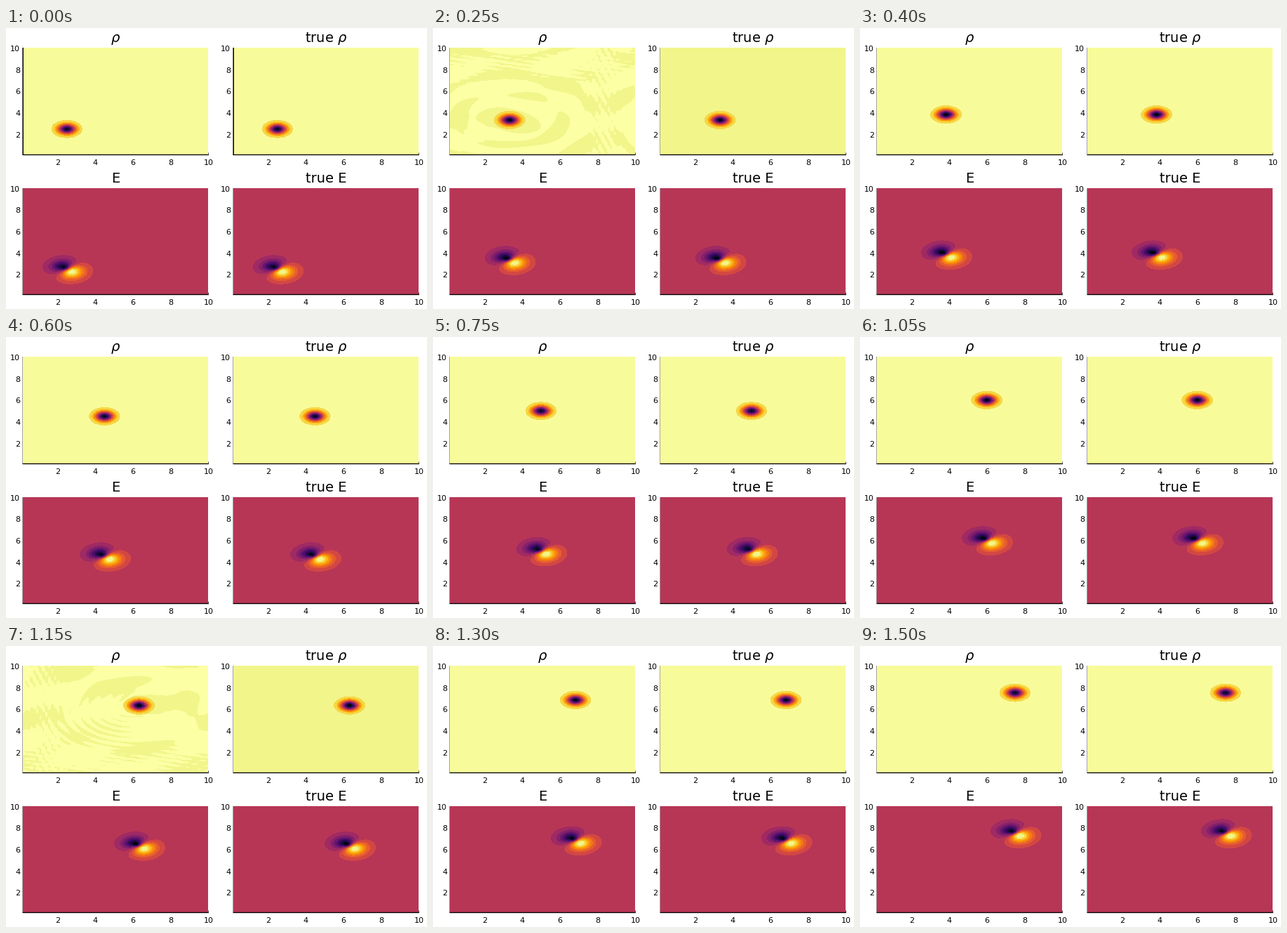
These frames come from a looping animation (600 by 400 pixels, 1550 ms). A matplotlib script:

```python
import numpy as np
import matplotlib.pyplot as plt
from matplotlib.animation import FuncAnimation

W, H, DPI = 600, 400, 100
FRAMES, STEP_MS = 31, 50
BANDS = 15
PALE, PALE_NOISY, PALE_TOP = "#f8fb9a", "#f2f58a", "#fcffa4"
CRIMSON = "#b73656"

plt.rcParams["font.family"] = "DejaVu Sans"
plt.rcParams["mathtext.fontset"] = "dejavusans"

# periodic 10 x 10 box sampled on 64 x 64 points
N = 64
grid = np.arange(1, N + 1) * 10 / N
X, Y = np.meshgrid(grid, grid)
inferno = plt.get_cmap("inferno")
colors = [inferno((k + 0.5) / BANDS) for k in range(BANDS)]
e_colors = list(colors)
e_colors[BANDS // 2] = CRIMSON

fig = plt.figure(figsize=(W / DPI, H / DPI), dpi=DPI, facecolor="white")


def make_stage(zorder):
    """Pixel-space layer covering the whole figure."""
    layer = fig.add_axes([0, 0, 1, 1], zorder=zorder)
    layer.set_xlim(0, W)
    layer.set_ylim(H, 0)
    layer.axis("off")
    return layer


under, over = make_stage(-5), make_stage(5)


def line(layer, xs, ys, color="black", width=1.3):
    return layer.plot(xs, ys, color=color, lw=width * 72 / DPI,
                      solid_capstyle="butt", snap=False)[0]


def make_panel(left, top, bottom, title):
    """Plot area with title and tick labels; returns it and its side axis."""
    width, height = 264, bottom - top
    ax = fig.add_axes([left / W, 1 - bottom / H, width / W, height / H])
    ax.set_xlim(grid[0], grid[-1])
    ax.set_ylim(grid[0], grid[-1])
    ax.set_xticks([])
    ax.set_yticks([])
    for spine in ax.spines.values():
        spine.set_visible(False)

    over.text(left + 132.3, bottom - 159.5, title, fontsize=14, ha="center")
    right = left + width + 0.5
    for v in range(2, 11, 2):
        part = (v - grid[0]) / (grid[-1] - grid[0])
        over.text(left + part * (right - left), bottom + 15, str(v),
                  fontsize=8, ha="center")
        over.text(left - 3.7, bottom - part * height + 4.7, str(v),
                  fontsize=8, ha="right")
    line(over, [left - 0.3, right + 0.5], [bottom + 0.5] * 2)
    line(over, [right] * 2, [bottom - 2.5, bottom + 0.5], "#444444", 0.9)
    # the fill hides most of the lower copy of the side axis
    xs, ys = [left + 0.3] * 2, [top, bottom + 1]
    line(under, xs, ys)
    return ax, line(over, xs, ys)


rho_panels = [make_panel(24, 28, 180, r"$\rho$"),
              make_panel(324, 28, 180, r"true $\rho$")]
e_panels = [make_panel(24, 228, 379, "E"),
            make_panel(324, 228, 379, "true E")]
for _, side in e_panels:
    side.set_visible(False)
drawn = []


def charge(c):
    return -np.exp(-4.25 * ((X - c) ** 2 + (Y - c) ** 2))


def field(c):
    """Two opposite lobes, the negative one with a tighter core."""
    dx, dy = X - c, Y - c
    r2 = dx ** 2 + dy ** 2
    u = (dx - dy) / np.sqrt(2)
    e = 1.35 * u / np.sqrt(r2 + 0.04) * np.exp(-r2 / 0.67)
    e -= 0.45 * np.exp(-r2 / 0.05)
    return np.where(e < 0, e / -e.min(), e / e.max())


def ripples(c, i):
    """Round-off residue: rings and waves round the charge, hatching opposite."""
    rng = np.random.default_rng(i)
    p = rng.uniform(0, 2 * np.pi, 4)
    late = i / (FRAMES - 1)
    dx, dy = (X - c + 5) % 10 - 5, (Y - c + 5) % 10 - 5
    d = np.hypot(dx, dy)
    a = np.arctan2(dy, dx)
    far_x, far_y = 5 - abs(dx), 5 - abs(dy)
    rings = np.cos(3.6 * d + 0.9 * np.sin(2 * a + p[0])) * np.exp(-d / 6)
    waves = np.cos(13 * d + 2 * np.sin(3 * a))
    waves *= np.exp(-((dx + 2) ** 2 + (dy + 2) ** 2) / 5)
    swell = 0.35 * np.sin(0.63 * (X + 2 * Y) + p[1])
    swell += 0.3 * np.sin(0.63 * (2 * X - 3 * Y) + p[2])
    hatch = 0.8 * np.cos(17 * dx + 5 * dy) * np.exp(-far_x ** 2 / 0.5)
    hatch += 0.7 * np.cos(15 * dy + 4 * dx + p[3]) * np.exp(-far_y ** 2 / 1.2)
    return (1 - late) * rings + 1.2 * late * waves + swell + hatch + 0.1


def fill(ax, z, levels, cols):
    drawn.append(ax.contourf(X, Y, z, levels=levels, colors=cols))


def band_levels(lo, hi):
    levels = np.linspace(lo, hi, BANDS + 1)
    levels[0] -= 1e-6
    levels[-1] += 1e-6
    return levels


def draw(i):
    while drawn:
        drawn.pop().remove()
    c = 2.5 + 5 * i / (FRAMES - 1)
    noisy = i % 9 in (4, 5)

    rho = charge(c)
    rho_levels = band_levels(rho.min(), 0)[:-1]
    for k, (ax, side) in enumerate(rho_panels):
        ax.set_facecolor(PALE_NOISY if noisy else PALE)
        if noisy and k == 0:
            fill(ax, ripples(c, i), [0, 9], [PALE_TOP])
        fill(ax, rho, rho_levels, colors[:-1])
        side.set_visible(i == 0)

    e = field(c)
    e_levels = band_levels(e.min(), e.max())
    for ax, _ in e_panels:
        ax.set_facecolor(CRIMSON)
        fill(ax, e, e_levels, e_colors)
    return []


anim = FuncAnimation(fig, draw, frames=FRAMES, interval=STEP_MS,
                     repeat=True, repeat_delay=0, blit=False)
plt.show()
```
